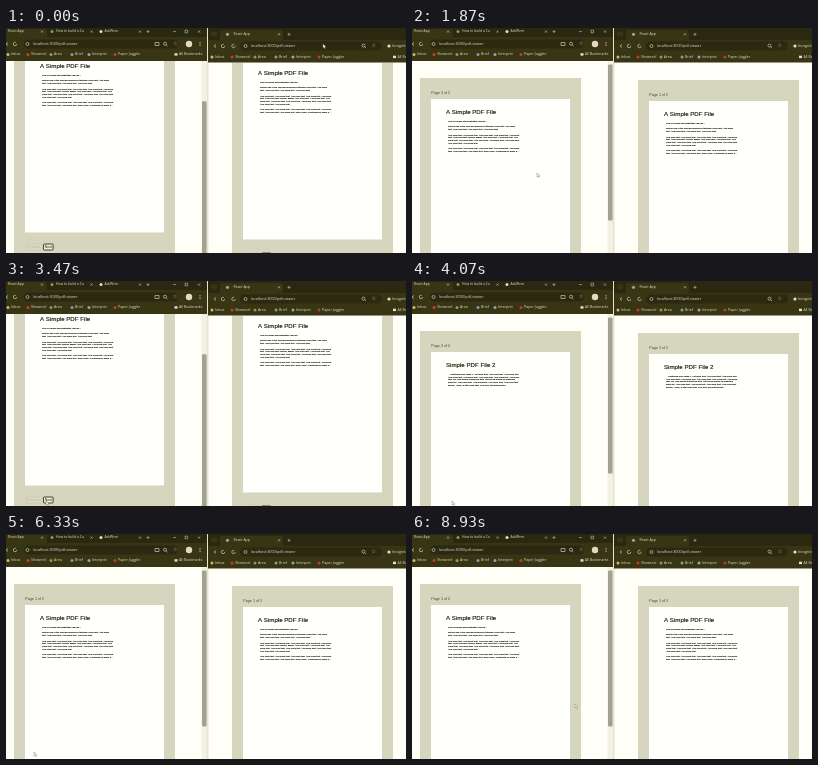
An HTML page with a canvas for the animation above (9000 ms loop, 400 by 225 pixels).

```html
<!DOCTYPE html>
<html lang="en">
<head>
<meta charset="utf-8">
<title>PDF viewer in two windows</title>
<style>
html, body { margin: 0; width: 100%; height: 100%; overflow: hidden; background: #fffff8; }
canvas { display: block; width: 400px; height: 225px; }
</style>
</head>
<body>
<canvas id="stage" width="400" height="225"></canvas>
<script>
const LOOP = 9000;
const NEXT_CLICK = 3900, PREVIOUS_CLICK = 6250;
const SANS = '"Liberation Sans", Arial, sans-serif';
const UI = '"Open Sans", "Noto Sans", sans-serif';
const STRIP = '#2a2810', BAR = '#383515', FIELD = '#2b290f', PALE = '#e2e1c8';
const PAGE = '#fffff8', FRAME = '#d6d5bd', PAPER = '#fffffb', INK = '#1c1b0c';

const ctx = document.getElementById('stage').getContext('2d');

// Each key is [time, value(s)]; values ease from one key to the next.
// A page change reloads the document, which puts both windows back at the top.
const leftScroll = [[0, 46], [470, 46], [700, 0], [1870, 0], [2100, 46], [NEXT_CLICK, 46],
  [NEXT_CLICK, 0], [4870, 0], [5130, 46], [PREVIOUS_CLICK, 46], [PREVIOUS_CLICK, 0]];
const rightScroll = [[0, 41], [1070, 41], [1270, 0], [2260, 0], [2450, 41],
  [NEXT_CLICK, 41], [NEXT_CLICK, 0]];
const pointer = [[0, 317, 16], [70, 317, 16], [200, 74, 216], [700, 74, 216], [900, 300, 99],
  [1530, 300, 99], [1670, 125, 145], [2100, 125, 145], [2260, 256, 134], [2800, 256, 134],
  [3400, 40, 220], [4670, 40, 220], [5000, 52, 220], [5400, 52, 220], [5800, 28, 218],
  [6670, 28, 218], [7050, 83, 189], [7600, 83, 189], [8400, 163, 170]];

const pages = [
  { title: 'A Simple PDF File', rows: [
    'This is a small demonstration .pdf file -',
    '',
    'just for use in the Norvale Machinery tutorials. More text. And more',
    'text. And more text. And more text. And more text.',
    '',
    'And more text. And more text. And more text. And more text. And more',
    'text. And more text. Boring, zzzzz. And more text. And more text. And',
    'more text. And more text. And more text. And more text. And more text.',
    'And more text. And more text.',
    '',
    'And more text. And more text. And more text. And more text. And more',
    'text. And more text. And more text. Even more. Continued on page 2 ...'] },
  { title: 'Simple PDF File 2', rows: [
    ' ...continued from page 1. Yet more text. And more text. And more text.',
    'And more text. And more text. And more text. And more text. And more',
    'text. Oh, how boring typing this stuff. But not as boring as watching',
    'paint dry. And more text. And more text. And more text. And more text.',
    'Boring.  More, a little more text. The end, and just as well.'] }
];

const bookmarks = [['Inbox', 5, '#c8bd6a'], ['Showreel', 25, '#d8381c'], ['Area', 48, '#86a05a'],
  ['Brief', 69, '#7d9fb0'], ['Interpret', 86, '#8fa6c0'], ['Paper Juggler', 112, '#b8402a']];

function at(keys, t) {
  let i = keys.length - 1;
  while (i > 0 && keys[i][0] > t) i--;
  const a = keys[i], b = keys[i + 1];
  if (!b) return a.slice(1);
  const p = (t - a[0]) / (b[0] - a[0]), e = p * p * (3 - 2 * p);
  return a.slice(1).map((v, k) => v + (b[k + 1] - v) * e);
}

function box(x, y, w, h, color) {
  ctx.fillStyle = color;
  ctx.fillRect(x, y, w, h);
}

function pill(x, y, w, h, r, color) {
  ctx.fillStyle = color;
  ctx.beginPath();
  ctx.roundRect(x, y, w, h, r);
  ctx.fill();
}

function dot(x, y, r, color) {
  pill(x - r, y - r, 2 * r, 2 * r, r, color);
}

function text(str, x, y, size, color, font = UI) {
  ctx.font = size + 'px ' + font;
  ctx.fillStyle = color;
  ctx.fillText(str, x, y);
}

// Text with a thin outline, for the heavier print of the document.
function print(str, x, y, size, weight) {
  text(str, x, y, size, INK, SANS);
  ctx.strokeStyle = INK;
  ctx.lineWidth = weight;
  ctx.strokeText(str, x, y);
}

function line(color, width, ...pts) {
  ctx.strokeStyle = color;
  ctx.lineWidth = width;
  ctx.beginPath();
  for (let i = 0; i < pts.length; i += 2) ctx.lineTo(pts[i], pts[i + 1]);
  ctx.stroke();
}

function ring(x, y, r, end = 7) {
  ctx.strokeStyle = PALE;
  ctx.lineWidth = 0.6;
  ctx.beginPath();
  ctx.arc(x, y, r, 0, end);
  ctx.stroke();
}

function lens(x, y) {
  ring(x, y, 1.5);
  line(PALE, 0.6, x + 1.1, y + 1.1, x + 2.5, y + 2.5);
}

function cross(x, y) {
  line(PALE, 0.5, x - 1, y - 1, x + 1, y + 1);
  line(PALE, 0.5, x - 1, y + 1, x + 1, y - 1);
}

function plus(x, y) {
  line(PALE, 0.5, x - 1.5, y, x + 1.5, y);
  line(PALE, 0.5, x, y - 1.5, x, y + 1.5);
}

function button(label, x, y, w, on) {
  ctx.strokeStyle = on ? INK : '#c3c2a4';
  ctx.lineWidth = on ? 0.8 : 0.5;
  ctx.beginPath();
  ctx.roundRect(x, y, w, 6, 0.8);
  ctx.fillStyle = on ? '#efeedd' : '#dad9c3';
  ctx.fill();
  ctx.stroke();
  text(label, x + 1.3, y + 3.1, 3.4, on ? INK : '#b5b497', SANS);
}

// Document area, in left window coordinates with x and y shifts.
function viewer(dx, dy, top, scroll, page) {
  ctx.save();
  ctx.beginPath();
  ctx.rect(dx ? 203 : 0, top, 201, 225 - top);
  ctx.clip();
  ctx.translate(dx, dy - scroll);
  box(8, 50, 161, 240, FRAME);
  box(19, 71, 139, 179.5, PAPER);
  text(`Page ${page + 1} of 2`, 19.3, 64.7, 3.7, '#45442c', SANS);
  print(pages[page].title, 34, 84.7, 6.15, 0.15);
  pages[page].rows.forEach((row, i) => print(row, 36, 93.2 + i * 2.75, 2.27, 0.12));
  button('Previous', 20, 262 + dy, 16.3, page === 1);
  button('Next', 37.5, 262 + dy, 9.6, page === 0);
  ctx.restore();
}

function toolbar(x, y) {
  line(PALE, 0.6, x + 7, y - 1.5, x + 5, y, x + 7, y + 1.5);
  ring(x + 14, y, 1.7, 5.2);
}

function marks(dx, y) {
  for (const [name, x, color] of bookmarks) {
    dot(x + dx - 3, y, 1.5, color);
    text(name, x + dx, y, 3.6, PALE);
  }
}

function folder(x, y) {
  box(x, y - 1.3, 3, 2.4, PALE);
  text('All Bookmarks', x + 4.5, y, 3.5, PALE);
}

function leftChrome() {
  box(0, 0, 201, 33, BAR);
  box(0, 0, 201, 9, STRIP);
  pill(-4, 1, 45, 10, 2, BAR);
  text('React App', 2, 3.6, 3.4, PALE);
  cross(36, 3.6);
  dot(46, 3.6, 1.5, '#8c9a55');
  text('How to build a Cu', 50, 3.6, 3.4, PALE);
  cross(85.5, 3.6);
  dot(95, 3.6, 1.5, PALE);
  text('AskWren', 98.5, 3.6, 3.4, PALE);
  cross(134, 3.6);
  plus(142, 3.6);
  line(PALE, 0.5, 167, 3.6, 170, 3.6);
  ctx.strokeRect(179, 2.2, 2.6, 2.6);
  cross(193, 3.6);

  toolbar(-5, 16);
  pill(18, 11.5, 154, 9, 4.5, FIELD);
  ring(21.5, 16, 1.5);
  text('localhost:3000/pdf-viewer', 27, 16, 3.7, PALE);
  ctx.strokeRect(149, 14.5, 4, 3);
  lens(159, 15.7);
  text('☆', 167, 16, 5, PALE, '"DejaVu Sans", sans-serif');
  dot(183, 16, 3.2, '#e6d6c4');
  for (let i = -1; i < 2; i++) dot(194, 16 + i * 1.6, 0.5, PALE);

  marks(0, 26.5);
  folder(168.5, 26.5);
}

function rightChrome() {
  box(202, 0, 198, 34.5, BAR);
  box(202, 0, 198, 12, STRIP);
  pill(214, 2, 63, 12, 2, BAR);
  pill(205, 3.5, 6, 5, 1.5, BAR);
  dot(221.5, 6.3, 1.6, '#8aa8a0');
  text('React App', 227.5, 6.3, 3.5, PALE);
  cross(273, 6.3);
  plus(283, 6.3);

  toolbar(203, 18);
  ring(227.5, 18, 1.7, 5.2);
  pill(234, 13.5, 142, 9, 4.5, FIELD);
  ring(239.5, 18, 1.5);
  text('localhost:3000/pdf-viewer', 244.8, 18, 3.7, PALE);
  lens(357.5, 17.6);
  text('☆', 365.5, 18, 5, PALE, '"DejaVu Sans", sans-serif');
  dot(383, 18, 1.6, PALE);
  text('Incognito', 386, 18, 3.6, PALE);

  marks(204, 29);
  folder(387, 29);
}

function arrow(x, y) {
  ctx.beginPath();
  for (const [a, b] of [[0, 0], [0, 4], [1, 3.2], [1.8, 4.6], [2.4, 4.2], [1.8, 2.9], [2.9, 2.8]])
    ctx.lineTo(x + a, y + b);
  ctx.closePath();
  ctx.fillStyle = '#fffff4';
  ctx.fill();
  ctx.strokeStyle = '#6a6848';
  ctx.lineWidth = 0.4;
  ctx.stroke();
}

function draw(now) {
  const t = now % LOOP;
  const page = t >= NEXT_CLICK && t < PREVIOUS_CLICK ? 1 : 0;
  const [left] = at(leftScroll, t), [right] = at(rightScroll, t);
  ctx.textBaseline = 'middle';
  ctx.lineJoin = 'round';
  box(0, 0, 400, 225, PAGE);
  viewer(0, 0, 33, left, page);
  viewer(218, 2, 34.5, right, page);

  box(195.5, 33, 5.5, 192, '#f2f1e2');
  pill(196, 36.5 + left * 0.8, 4.6, 156, 1, '#a3a290');
  box(201, 0, 1.5, 225, '#e4e3d0');
  leftChrome();
  rightChrome();
  arrow(...at(pointer, t));
  requestAnimationFrame(draw);
}
requestAnimationFrame(draw);
</script>
</body>
</html>
```
